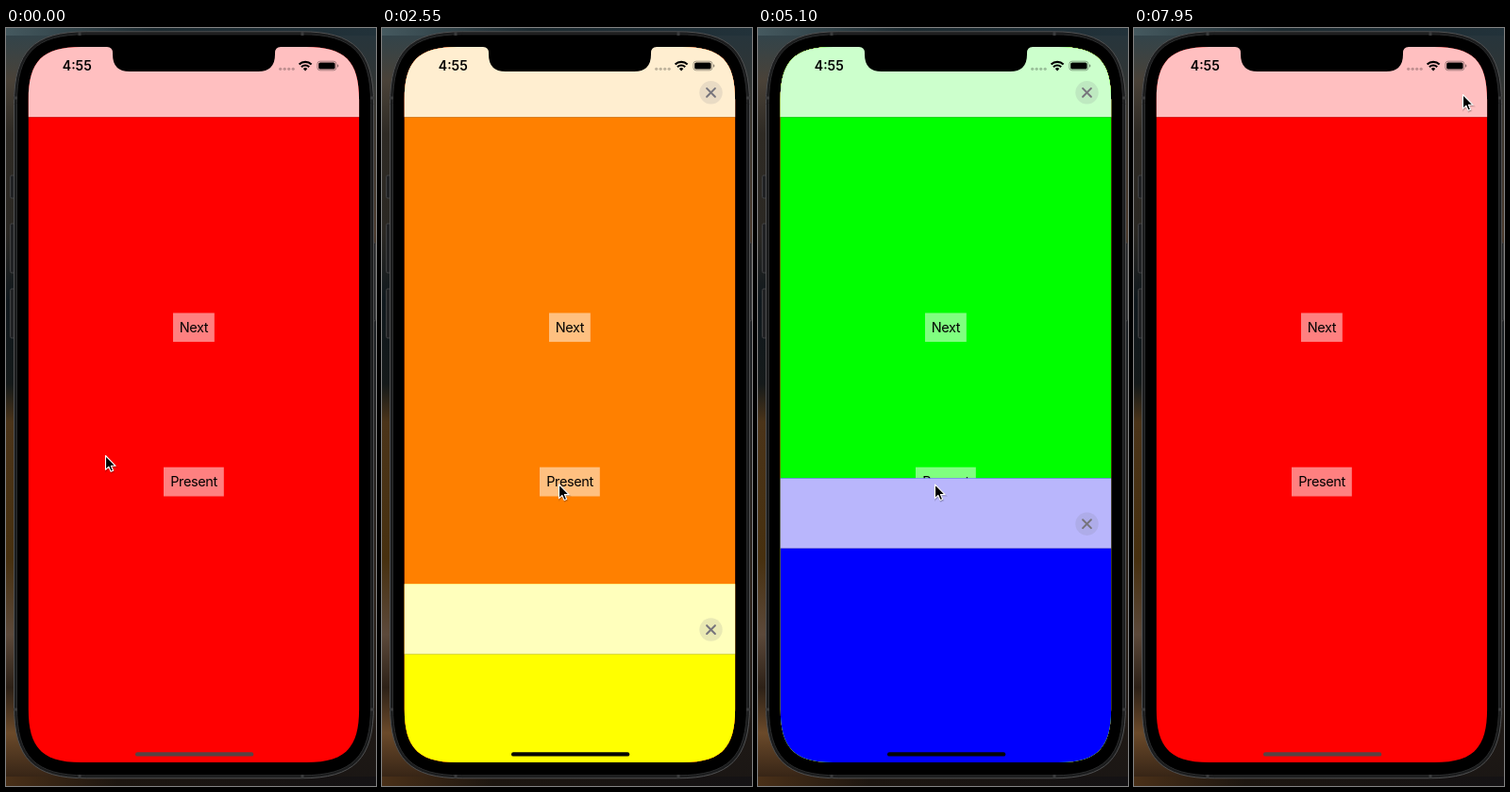
An HTML page for the animation above (8 s loop, 392x802 px).

```html
<!DOCTYPE html>
<html lang="en">
<head>
<meta charset="utf-8">
<title>Modal stack</title>
<style>
  html, body { margin: 0; width: 100%; height: 100%; overflow: hidden; background: #000; }
  svg { display: block; width: 392px; height: 802px; }
  text { font-family: Inter, Roboto, sans-serif; text-anchor: middle; }
  .label { font-size: 14.5px; letter-spacing: -0.4px; }
  .clock { font-size: 14px; font-weight: 600; }
</style>
</head>
<body>
<svg viewBox="0 0 392 802" xmlns="http://www.w3.org/2000/svg">
  <defs>
    <linearGradient id="left" x2="0" y2="1">
      <stop offset="0" stop-color="#2f444d"/>
      <stop offset=".07" stop-color="#4a4238"/>
      <stop offset=".14" stop-color="#2e2a24"/>
      <stop offset=".27" stop-color="#2b2823"/>
      <stop offset=".36" stop-color="#10181d"/>
      <stop offset=".47" stop-color="#151a1a"/>
      <stop offset=".52" stop-color="#4b3419"/>
      <stop offset=".7" stop-color="#47300f"/>
      <stop offset=".8" stop-color="#5c493a"/>
      <stop offset=".87" stop-color="#2d2117"/>
      <stop offset=".93" stop-color="#6b4a2a"/>
      <stop offset="1" stop-color="#2c1d12"/>
    </linearGradient>
    <linearGradient id="right" x2="0" y2="1">
      <stop offset="0" stop-color="#25353d"/>
      <stop offset=".12" stop-color="#3a352e"/>
      <stop offset=".27" stop-color="#4a3a2c"/>
      <stop offset=".4" stop-color="#1c2024"/>
      <stop offset=".75" stop-color="#2a2018"/>
      <stop offset="1" stop-color="#1a1614"/>
    </linearGradient>
    <linearGradient id="top">
      <stop offset="0" stop-color="#45595f"/>
      <stop offset=".4" stop-color="#1b292f"/>
      <stop offset="1" stop-color="#22323a"/>
    </linearGradient>
    <linearGradient id="bottom">
      <stop offset="0" stop-color="#4a3018"/>
      <stop offset=".3" stop-color="#1d1610"/>
      <stop offset="1" stop-color="#141214"/>
    </linearGradient>
    <clipPath id="screen"><path id="glass"/></clipPath>
  </defs>

  <!-- wallpaper -->
  <rect width="196" height="802" fill="url(#left)"/>
  <rect x="196" width="196" height="802" fill="url(#right)"/>
  <rect width="392" height="8" fill="url(#top)"/>
  <rect y="792" width="392" height="10" fill="url(#bottom)"/>

  <!-- phone body -->
  <g fill="#202123" stroke="#4a4b4c" stroke-width=".8">
    <rect x="4.5" y="156" width="6" height="24" rx="1.5"/>
    <rect x="4.5" y="207" width="6" height="52" rx="1.5"/>
    <rect x="4.5" y="276" width="6" height="52" rx="1.5"/>
    <rect x="386" y="227" width="5.5" height="83" rx="1.5"/>
  </g>
  <path id="frame" fill="#1b1c1d" stroke="#505152"/>
  <path id="bezel" fill="#000" stroke="#2b2c2d"/>
  <path d="M78 4v4M314 4v4M78 790v4M314 790v4M8 74h4M386 74h4M8 721h4M386 721h4" stroke="#3a3b3c" stroke-width="3"/>

  <g clip-path="url(#screen)">
    <g id="pages"></g>
    <path d="M107 20Q113 20 113 26.5V28Q113 46 131 46H267Q285 46 285 28V26.5Q285 20 291 20Z" fill="#000"/>
    <text class="clock" x="75.3" y="45">4:55</text>
    <g fill="#000" fill-opacity=".25">
      <circle cx="290.7" cy="43.3" r="1.6"/>
      <circle cx="295.2" cy="43.3" r="1.6"/>
      <circle cx="299.7" cy="43.3" r="1.6"/>
      <circle cx="304.2" cy="43.3" r="1.6"/>
    </g>
    <g fill="none" stroke="#000" stroke-width="2.1">
      <path d="M310.6 38.6a9.2 9.2 0 0 1 13 0"/>
      <path d="M313 41.2a5.8 5.8 0 0 1 8.2 0"/>
    </g>
    <path d="M317.1 45.4l-2.2 -2.3a3.1 3.1 0 0 1 4.4 0z"/>
    <rect x="329.9" y="35.2" width="20" height="9.6" rx="2.8" fill="none" stroke="#000" stroke-opacity=".4" stroke-width=".9"/>
    <rect x="331.2" y="36.5" width="17.4" height="7" rx="1.6"/>
    <path d="M351 38.3q1.4 .5 1.4 1.7t-1.4 1.7z" fill-opacity=".45"/>
    <rect id="home" x="137" y="766.2" width="125.3" height="4.4" rx="2.2"/>
  </g>

  <g id="cursor">
    <path d="M0 0V14.8L3.4 11.7 5.6 16.8 8.1 15.7 5.9 10.8H10.6Z" transform="translate(.5 1.2)" fill-opacity=".25" stroke="#000" stroke-opacity=".12" stroke-width="2"/>
    <path d="M0 0V14.8L3.4 11.7 5.6 16.8 8.1 15.7 5.9 10.8H10.6Z" stroke="#fff" stroke-width="1.1" stroke-linejoin="round"/>
  </g>
</svg>
<script>
const LOOP = 8000, HEIGHT = 757, CLOSE_AT = 6980;
const pages = [
  { body: '#ff0000', bar: '#ffbfc0', start: -1e4, press: 1000 },
  { body: '#ff8000', bar: '#ffeed0', start: 1029.7, press: 2480 },
  { body: '#ffff00', bar: '#ffffbc', start: 2497.7, press: 3695 },
  { body: '#00ff00', bar: '#ccffcc', start: 3702, press: 4940 },
  { body: '#0000ff', bar: '#b9b6fc', start: 5025 }
];
const $ = id => document.getElementById(id);
const clamp = v => Math.max(0, Math.min(1, v));
const ramp = (t, a, b) => clamp((t - a) / (b - a));
const ease = p => p * p * (3 - 2 * p);
const mix = (a, b, p) => a + (b - a) * p;

// Rounded box whose corners flow smoothly into the sides.
function smoothBox(x, y, w, h, r) {
  const d = 1.3 * r, c = 0.348 * r, k = d - c;
  return `M${x + d} ${y}h${w - 2 * d}c${k} 0 ${d} ${c} ${d} ${d}` +
    `v${h - 2 * d}c0 ${k} ${-c} ${d} ${-d} ${d}` +
    `h${2 * d - w}c${-k} 0 ${-d} ${-c} ${-d} ${-d}` +
    `v${2 * d - h}c0 ${-k} ${c} ${-d} ${d} ${-d}z`;
}
$('glass').setAttribute('d', smoothBox(23.8, 20, 350.3, HEIGHT, 43));
$('frame').setAttribute('d', smoothBox(8.5, 3.8, 381, 790, 59));
$('bezel').setAttribute('d', smoothBox(11.5, 6.8, 375, 784, 56));

// Critically damped spring: part of the way still to go.
function remaining(ms) {
  if (ms <= 0) return 1;
  const x = ms * 0.018;
  return x > 11 ? 0 : (1 + x) * Math.exp(-x);
}

const button = (name, x, y, w, h) =>
  `<rect x="${x}" y="${y}" width="${w}" height="${h}" fill="#fff" fill-opacity=".5"/>
   <text class="label" x="199" y="${y + 20.7}">${name}</text>`;

const closeButton =
  `<circle cx="348.5" cy="68.3" r="12.2" fill="#767680" fill-opacity=".16"/>
   <path class="cross" d="M344.1 63.9l8.8 8.8m0 -8.8l-8.8 8.8" stroke="#77757c" stroke-width="2" stroke-linecap="round"/>`;

$('pages').innerHTML = pages.map((p, i) =>
  `<g>
    <rect x="23" y="20" width="352" height="760" fill="${p.body}"/>
    <rect x="23" y="20" width="352" height="74.2" fill="${p.bar}"/>
    <rect x="23" y="94.1" width="352" height=".6" fill-opacity=".25"/>
    ${i ? closeButton : ''}
    ${p.press ? button('Next', 177, 301.5, 43.8, 30.6) + button('Present', 167, 464.7, 63.8, 30.8) : ''}
  </g>`).join('');
pages.forEach((p, i) => {
  p.node = $('pages').children[i];
  p.label = p.node.querySelectorAll('.label')[1];
});
const cross = pages[4].node.querySelector('.cross');

function homeColor(t) {
  const onRed = [88, 68, 68], onBlue = [74, 74, 104], black = [6, 6, 4];
  let from = onRed, to = black, p = ramp(t, 1030, 1090);
  if (t > 3000) { from = black; to = onBlue; p = ramp(t, 5100, 5450); }
  if (t > 6000) { from = onBlue; to = onRed; p = ramp(t, 7050, 7350); }
  return `rgb(${from.map((v, i) => Math.round(mix(v, to[i], p)))})`;
}

function draw(t) {
  pages.forEach((p, i) => {
    let y = HEIGHT * remaining(t - p.start);
    if (i === 4 && t > CLOSE_AT) y = HEIGHT * (1 - remaining(t - CLOSE_AT));
    const covered = i && i < 4 && t >= CLOSE_AT;
    p.node.setAttribute('transform', `translate(0 ${y.toFixed(2)})`);
    p.node.setAttribute('visibility', covered || y > HEIGHT - 0.2 ? 'hidden' : 'visible');
    if (p.label) {
      const next = pages[i + 1].start;
      const down = t >= p.press && t < next + 45;
      p.label.setAttribute('opacity', down ? mix(0.35, 1, ramp(t, next, next + 45)) : 1);
    }
  });
  const held = ramp(t, 6780, 6900) - ramp(t, 7000, 7300);
  cross.setAttribute('opacity', 1 - 0.83 * held);
  $('home').setAttribute('fill', homeColor(t));

  const a = ease(ramp(t, 20, 500)), b = ease(ramp(t, 5870, 6650));
  const x = mix(mix(105.5, 187.5, a), 348.5, b);
  const y = mix(mix(452.5, 482.8, a), 70.5, b);
  $('cursor').setAttribute('transform', `translate(${x.toFixed(2)} ${y.toFixed(2)})`);
}

function tick() {
  draw(performance.now() % LOOP);
  requestAnimationFrame(tick);
}
tick();
</script>
</body>
</html>
```
